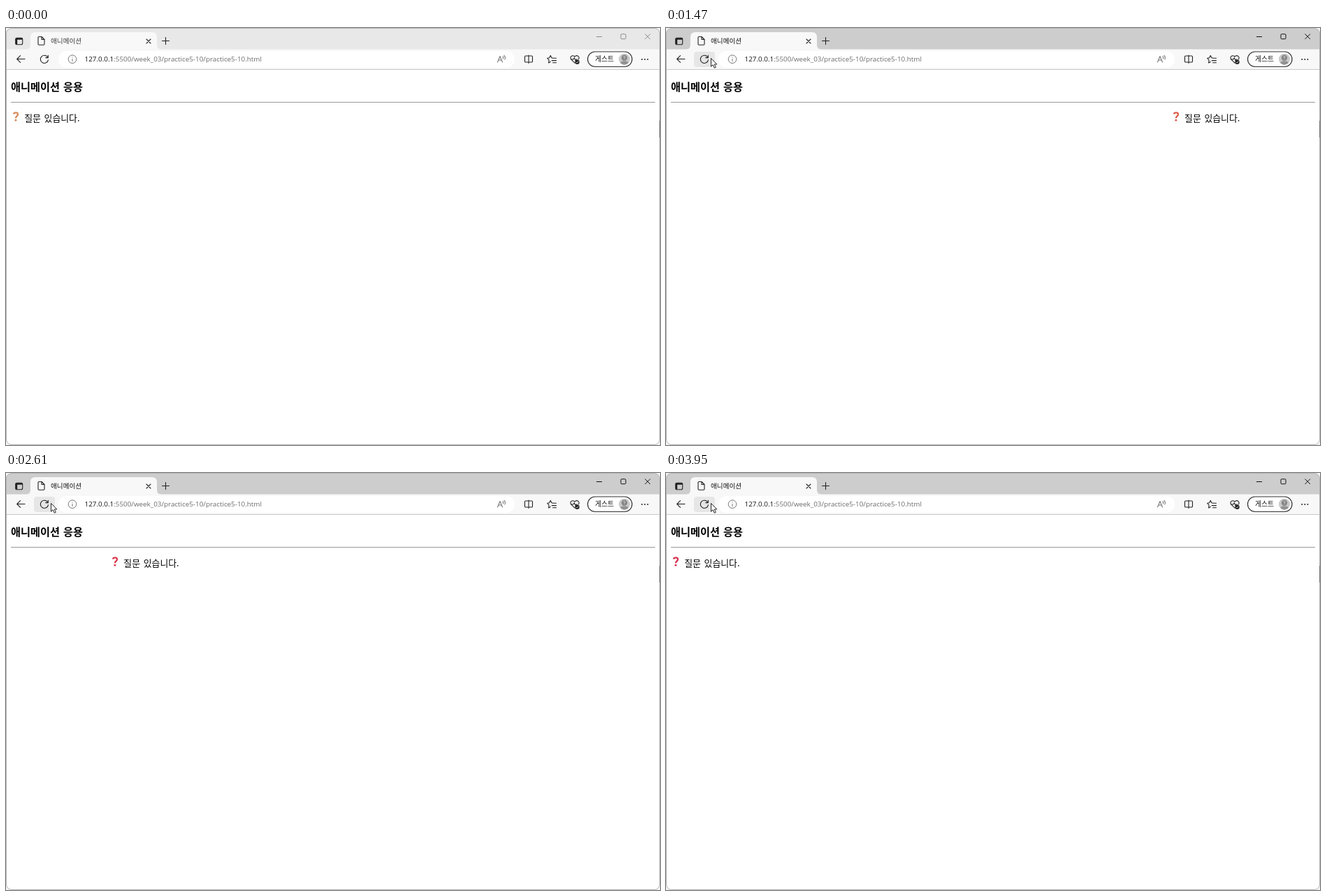
These frames come from a looping animation (936 by 598 pixels, 4.02 s). An HTML page:

```html
<!DOCTYPE html>
<html lang="ko">
<head>
<meta charset="utf-8">
<title>애니메이션</title>
<style>
  html, body { margin: 0; width: 100%; height: 100%; overflow: hidden; background: #fff; }
  #stage {
    --bar: #e8e8e8; --control: #8b8b8b; --label: #3c3c3c;
    position: relative; width: 936px; height: 598px; overflow: hidden;
    font-family: 'Noto Sans CJK KR', 'Noto Sans CJK', sans-serif; color: #000;
  }
  #stage.focused { --bar: #cdcdcd; --control: #111; --label: #111; }
  #stage > svg { position: absolute; left: 0; top: 0; }
  #hover { visibility: hidden; }
  .hovered #hover { visibility: visible; }
  .line { fill: none; stroke: #222; stroke-width: 1.1; stroke-linecap: round; stroke-linejoin: round; }
  .control { fill: none; stroke: var(--control); stroke-width: 1; }
  .url { font: 9.85px 'Open Sans', sans-serif; fill: #6b6b6b; }
  #page { position: absolute; left: 7px; top: 0; width: 922px; word-spacing: 1px; }
  h1 { position: absolute; top: 72.5px; margin: 0; font-size: 15.2px; line-height: 20px; white-space: nowrap; }
  hr { position: absolute; top: 106px; width: 100%; height: 1px; margin: 0; border: 0; background: #999; }
  #question { position: absolute; top: 121.3px; left: 0; right: 0; font-size: 12.9px; line-height: 15.8px; }
  #question p { margin: 0; }
  #mark { width: 14.6px; height: 13px; overflow: visible; vertical-align: baseline; color: #d68a5c; }
  #cursor { transform: translate(-50px, -50px); }
</style>
</head>
<body>
<div id="stage">
  <svg width="936" height="598" viewBox="0 0 936 598">
    <!-- tab strip -->
    <rect width="936" height="60" fill="var(--bar)"/>
    <path d="M28 31Q35 31 35 24V13Q35 6 42 6H209Q216 6 216 13V24Q216 31 223 31Z" fill="#f8f8f8"/>
    <rect y="30.5" width="936" height="29" fill="#f8f8f8"/>
    <path d="M0 59.5H936" stroke="#c9c9c9"/>
    <rect x="13.7" y="14.2" width="10" height="9.6" rx="2" class="line"/>
    <path d="M14 15.5H23.5M15 15V23" fill="none" stroke="#222" stroke-width="2.4"/>
    <path class="line" d="M46 13.5Q46 12.5 47 12.5H51L55 16.5V23Q55 24.2 53.8 24.2H47.2Q46 24.2 46 23ZM51 12.5V16.5H55"/>
    <text x="64" y="21.6" font-size="9.6" fill="var(--label)">애니메이션</text>
    <path class="line" d="M201 16L207 22M207 16L201 22M223.5 18.5H233.5M228.5 13.5V23.5"/>
    <path class="control" d="M845 12.5H853M914.5 8.5L922 16M922 8.5L914.5 16"/>
    <rect class="control" x="880" y="8.7" width="7" height="7" rx="1.2"/>

    <!-- toolbar -->
    <rect id="hover" x="40" y="34" width="30" height="22" rx="4" fill="#e6e6e6"/>
    <path class="line" d="M16 44.5H27M20.5 39.7L15.7 44.5L20.5 49.3"/>
    <path class="line" d="M59.9 42.3A5.6 5.6 0 1 0 60.4 45.8M60.3 39.2V42.6H56.8"/>
    <rect x="75" y="33" width="653" height="24" rx="12" fill="#fff"/>
    <circle cx="95" cy="44.7" r="5.8" fill="none" stroke="#777"/>
    <path d="M95 44V48M95 41.5V42.6" stroke="#777"/>
    <text class="url" x="112.5" y="48.4"><tspan fill="#111">127.0.0.1</tspan>:5500/week_03/practice5-10/practice5-10.html</text>
    <path class="line" stroke-width="1" style="stroke:#777" d="M703.5 49L707 40.5L710.5 49M704.8 46H709.2M711 41Q712.4 42.4 711.4 44M712.8 39.5Q715.3 41.8 713.8 45"/>
    <path class="line" d="M747 40H743.8Q742.5 40 742.5 41.3V47.7Q742.5 49 743.8 49H747M749 40H752.2Q753.5 40 753.5 41.3V47.7Q753.5 49 752.2 49H749M748 39V50.5"/>
    <path class="line" d="M783 43.2L780.9 42.8L779.3 39.4L777.6 42.8L774.8 43.3L777.1 46L776.6 50L779.3 48.5M782.8 43.3H787.5M781.2 46.6H787.5M782.6 49.8H787.5"/>
    <path class="line" d="M814 50.2L809 45.2C805.8 41.6 811 37.4 814 41.2C817 37.4 822 41.5 819.4 44.8M808.5 45H812L813.3 42.8L815.2 46.5L816.2 45H817.5"/>
    <circle cx="817.5" cy="48.8" r="3.2" fill="#222"/>
    <path d="M816 48.8L817.2 50L819.2 47.7" fill="none" stroke="#fff" stroke-width=".8"/>
    <rect x="832.5" y="34" width="63.5" height="21.5" rx="10.75" fill="#fff" stroke="#333" stroke-width="1.2"/>
    <text x="843" y="48.3" font-size="9.8" fill="#111">게스트</text>
    <circle cx="885" cy="44.7" r="8" fill="#c9c9c9"/>
    <circle cx="885" cy="42.8" r="4.2" fill="#858585"/>
    <path d="M879.3 50.3Q880 47.5 882.5 47.5H887.5Q890 47.5 890.7 50.3Q885 55 879.3 50.3" fill="#929292"/>
    <path d="M883.8 42Q884 40.5 885.2 40.6Q887 41 885.2 43V43.8M885.2 44.6V45.4" fill="none" stroke="#ddd" stroke-width=".8"/>
    <g fill="#222"><circle cx="910.2" cy="45" r="1"/><circle cx="914.3" cy="45" r="1"/><circle cx="918.4" cy="45" r="1"/></g>
  </svg>

  <div id="page">
    <h1>애니메이션 응용</h1>
    <hr>
    <div id="question">
      <p><svg id="mark" viewBox="0 0 14.6 13">
        <path d="M4 2.5C4.4 -.3 9.8 -.6 10 2.7C10.1 5.4 6.9 5.2 6.9 8.3" fill="none" stroke="currentColor" stroke-width="2.3"/>
        <circle cx="6.9" cy="11.3" r="1.45" fill="currentColor"/>
      </svg> 질문 있습니다.</p>
    </div>
  </div>

  <svg width="936" height="598" viewBox="0 0 936 598">
    <path d="M0 0H936V598H0ZM8 .5Q.5 .5 .5 8V590Q.5 597.5 8 597.5H928Q935.5 597.5 935.5 590V8Q935.5 .5 928 .5Z" fill="#f4f4f4" fill-rule="evenodd"/>
    <rect x=".5" y=".5" width="935" height="597" rx="7.5" fill="none" stroke="#b5b5b5"/>
    <path d="M935.5 133V157" stroke="#777"/>
    <path id="cursor" d="M.5 .5V12.2L3.2 9.7L5.3 14.3L7.3 13.4L5.3 9H8.8Z" fill="#fff" stroke="#111" stroke-width=".9"/>
  </svg>
</div>
<script>
  const LOOP = 4020, TICK = 67, TICK_LEAD = 14;
  const HOVER_AT = 730, FOCUS_AT = 930;
  const reload = { delay: 970, duration: 3000, easing: 'ease' };
  const byId = id => document.getElementById(id);

  function pausedMotion(element, keyframes, options) {
    const motion = element.animate(keyframes, options);
    motion.pause();
    return motion;
  }

  const motions = [
    pausedMotion(document.querySelector('#question p'), { marginLeft: ['100%', '0%'] }, reload),
    pausedMotion(byId('mark'), { color: ['#de6a4a', '#da3050'] }, reload),
    pausedMotion(byId('cursor'),
      { transform: ['translate(136px, -9px)', 'translate(64px, 43px)'] },
      { delay: 200, duration: 535, easing: 'cubic-bezier(.2, .4, .5, 1)', fill: 'forwards' })
  ];
  const stage = byId('stage');
  const start = performance.now();

  function draw(now) {
    const elapsed = Math.max(0, now - start) % LOOP;
    // The screen refreshes in even ticks, about 15 per second.
    const tick = Math.min(LOOP / TICK - 1, Math.floor((elapsed + TICK_LEAD) / TICK));
    const time = tick * TICK;
    for (const motion of motions) motion.currentTime = time;
    stage.classList.toggle('hovered', time >= HOVER_AT);
    stage.classList.toggle('focused', time >= FOCUS_AT);
    requestAnimationFrame(draw);
  }
  draw(start);
</script>
</body>
</html>
```
